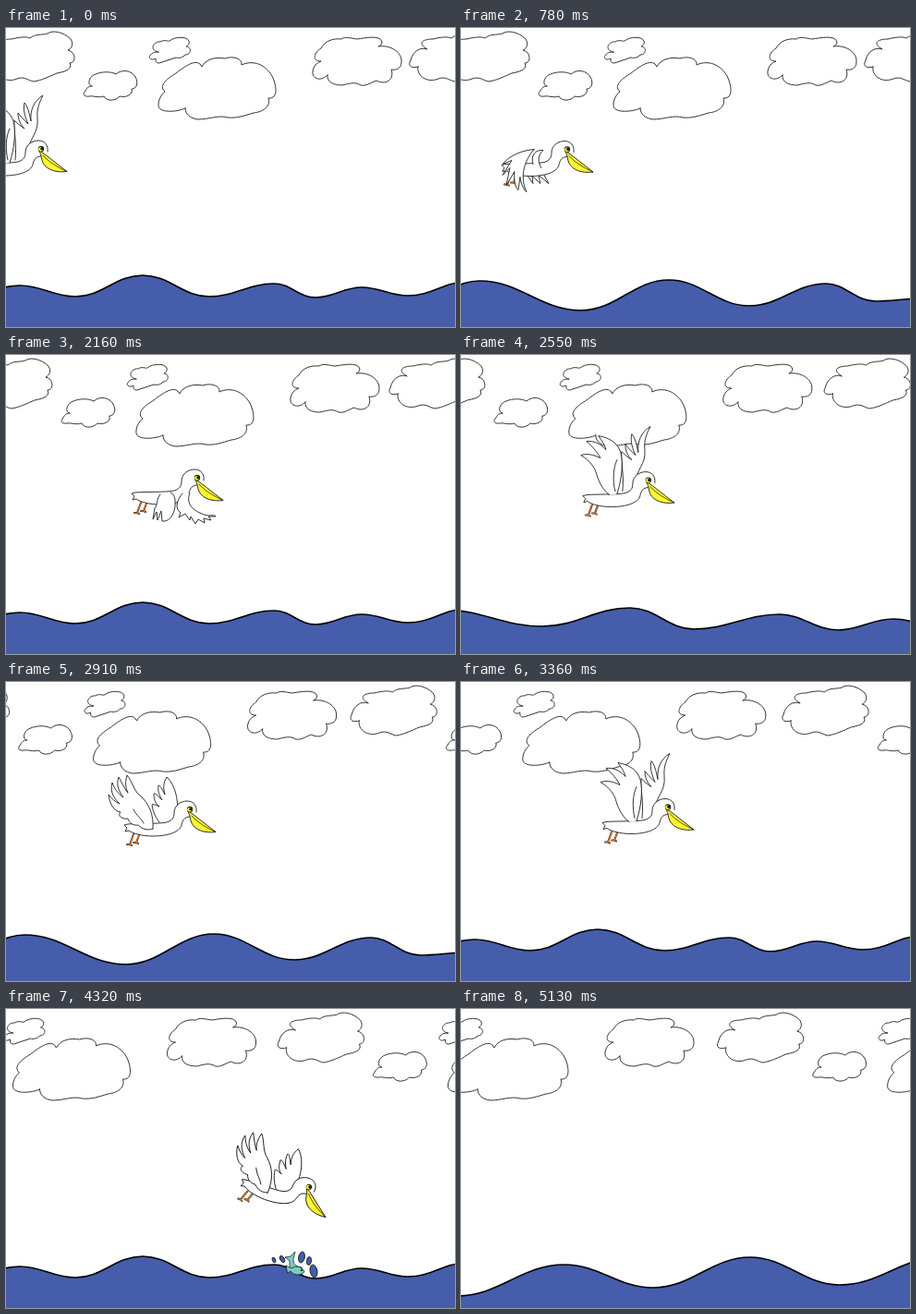
These frames come from a looping animation (486x324 px, 5250 ms). An HTML page with a canvas:

```html
<!DOCTYPE html>
<html lang="en">
<head>
<meta charset="utf-8">
<title>Pelican over the sea</title>
<style>
  html, body { margin: 0; width: 100%; height: 100%; overflow: hidden; background: #fff; }
  canvas { display: block; width: 486px; height: 324px; }
</style>
</head>
<body>
<canvas id="stage" width="486" height="324"></canvas>
<script>
const ctx = document.getElementById('stage').getContext('2d');
const STEP = 30, LOOP = 5250, LAST = 171;
const YELLOW = '#fdf733', SEA = '#455dab', TEAL = '#7cccc0', ORANGE = '#d9772b';

const clouds = new Path2D(
  'M-10,42C-16,44 -22,42 -18,35C-16,26 -8,20 0,23C-12,16 -4,12 6,12C14,10 22,9 26,11C32,6 38,8 45,6C50,2 62,4 70,12C74,18 70,23 67,24C76,26 76,38 69,38C72,44 66,47 55,49C48,52 38,57 30,58C24,57 20,52 12,55C0,60 -12,52 -10,42Z' +
  'M93,63C87,62 90,52 97,50C104,47 114,47 119,50C126,44 136,46 140,53C144,60 141,66 136,66C138,72 130,76 123,74C119,79 109,80 106,74C100,76 93,73 91,74C83,75 83,71 86,68C88,64 90,63 93,63Z' +
  'M165,26C154,24 160,14 167,15C171,12 176,15 177,14C183,9 196,9 198,14C199,17 197,19 195,20C201,20 201,29 194,29C192,32 187,33 184,32C178,34 172,36 166,38C162,38 162,36 162,33C157,36 154,32 156,30C158,27 160,26 165,26Z' +
  'M194,87C186,91 164,93 165,83C165,78 168,72 172,69C164,62 176,54 184,49C193,42 204,34 210,39L212,42C216,34 226,31 237,33C246,30 256,33 255,40C268,34 281,40 288,52C293,62 295,77 284,76C287,86 277,91 268,92C258,95 250,98 240,97C230,94 220,99 208,99C199,98 194,93 194,87Z' +
  'M348,51C342,58 331,56 332,47C333,41 336,38 341,36C330,36 334,26 341,22C345,14 354,11 363,12C367,9 373,11 380,12C388,11 405,7 407,15C407,18 405,19 403,20C416,18 429,26 428,37C428,44 422,46 417,45C421,57 410,62 401,57C393,60 390,63 384,62C378,58 372,60 364,62C355,62 347,59 348,51Z');

// Crests and troughs of the four sea drawings.
const seas = [
  [[-50, 291], [15, 279], [75, 291], [148, 268], [220, 291], [290, 277], [335, 292], [385, 281], [435, 290], [500, 275]],
  [[-20, 276], [88, 294], [183, 274], [252, 297], [345, 281], [408, 298], [468, 286], [520, 295]],
  [[-40, 290], [20, 274], [130, 306], [225, 273], [312, 301], [395, 277], [448, 296], [500, 293]],
  [[-5, 311], [112, 277], [208, 302], [313, 269], [410, 299], [520, 269]]
].map(points => {
  let d = 'M' + points[0], [px, py] = points[0];
  for (const [x, y] of points.slice(1)) {
    const c = (x - px) * 0.4;
    d += `C${px + c},${py} ${x - c},${y} ${x},${y}`;
    [px, py] = [x, y];
  }
  return new Path2D(d + 'L530,340L-60,340Z');
});

// Bird parts are placed around the eye.
const body = new Path2D('M0,8C-6,8 -8,12 -9,17C-11,25 -25,29 -40,29C-52,29 -62,26 -66,23L-70,24L-68,20L-71,17L-67,16C-55,15 -35,16 -25,14C-19,12 -17,9 -17,4C-17,-5 -9,-9 -3,-9C4,-9 8,-4 7,3');
const beak = new Path2D('M-2,2L3,5L28,24.5C17,26 6,23 2,15C0,11 1,8 -2,2Z');
const beakLine = new Path2D('M2,7C8,14 18,20 28,24.5');
const openBeak = new Path2D('M0,4L12,5L36,4L24,7L6,9ZM1,6L27,25C18,27 11,23 3,10Z');
const legs = new Path2D('M-61,27L-65,38L-68,38M-65,38L-63,39M-55,28L-58,36L-61,36M-58,36L-56,37');

// Each pose: wings behind the body, then wings over it.
const poses = {
  A: ['M-14,4C-14,-12 -2,-16 -4,-34C-5,-44 -1,-52 2,-58C-8,-52 -12,-42 -11,-30C-13,-40 -15,-47 -18,-50C-20,-42 -17,-34 -14,-27C-19,-32 -23,-36 -25,-39C-25,-31 -22,-26 -18,-22C-23,-25 -27,-29 -29,-31C-30,-20 -26,-6 -28,12',
      'M-34,15C-29,0 -27,-18 -30,-30C-33,-40 -42,-46 -54,-48C-50,-42 -47,-38 -46,-33C-52,-40 -60,-43 -67,-42C-60,-36 -55,-30 -52,-24C-60,-28 -67,-29 -73,-27C-63,-21 -58,-14 -56,-6C-53,4 -48,12 -42,16M-36,12C-39,0 -38,-14 -34,-22'],
  B: ['M-15,12C-11,-4 -14,-25 -25,-35C-29,-28 -29,-23 -27,-16C-30,-22 -32,-26 -34,-26C-35,-20 -33,-15 -30,-10C-34,-14 -37,-18 -39,-17C-39,-10 -37,-6 -33,-3C-37,-5 -40,-6 -41,-5C-40,4 -36,10 -33,14',
      'M-40,21C-39,6 -44,-6 -53,-14C-61,-20 -62,-30 -68,-37C-70,-30 -70,-24 -67,-18C-72,-24 -74,-30 -77,-35C-80,-26 -77,-20 -72,-13C-78,-17 -82,-23 -84,-29C-87,-19 -82,-12 -76,-6C-81,-8 -85,-12 -88,-16C-87,-6 -82,2 -75,3C-79,7 -73,11 -67,10C-66,15 -60,18 -56,17C-51,22 -45,23 -40,21M-61,0C-58,7 -53,9 -50,15'],
  C: ['', 'M-40,18C-45,24 -42,28 -46,33L-48,45L-44,37L-43,46L-39,36L-38,47C-28,48 -23,36 -24,25C-24,20 -26,17 -29,16' +
      'M-16,17C-23,25 -24,34 -18,38L-20,43L-13,39L-8,46L-7,42L-2,50L1,45L8,49L7,44L15,46L12,42L20,42C18,39 12,43 5,39C-3,36 -8,31 -9,26C-10,22 -9,19 -8,17'],
  D: ['M-44,27L-37,37L-38,29L-29,37L-31,28L-20,37L-26,26Z',
      'M-37,16C-40,6 -34,0 -26,1C-32,6 -32,14 -28,20' +
      'M-36,0C-48,1 -62,6 -70,16L-60,12L-70,28L-62,20L-66,39L-57,24C-58,34 -56,42 -53,44L-51,30C-50,38 -47,44 -44,46C-51,32 -48,14 -36,0Z'],
  E: ['M-20,20C-12,32 4,31 9,26L-4,12Z',
      'M-27,14C-26,30 -30,45 -44,44L-60,41C-62,35 -61,30 -59,25L-54,40L-54,27L-47,41L-48,26L-41,39C-42,30 -43,22 -40,14ZM-40,26C-40,36 -34,36 -28,34M-11,12C-13,18 -10,20 -9,16L-6,22L-4,15L0,22']
};
for (const name in poses) poses[name] = poses[name].map(d => new Path2D(d));

const fishBody = new Path2D('M-11,-5L-5,-2C0,-6 8,-3 9,2C5,6 -3,6 -6,1L-9,3Z');
const fishTail = new Path2D('M6,5C-2,6 -8,0 -7,-10L-12,-14L-6,-15L-1,-20L-3,-12C-3,-5 1,-4 6,-3Z');

// step, x, y, tilt in degrees
const flight = [
  [0, 38, 131, 0], [50, 186, 132, 0], [59, 213, 132, 0], [72, 207, 133, 0], [97, 199, 138, 0],
  [127, 249, 133, 0], [134, 274, 145, 5], [144, 328, 193, 20], [156, 358, 281, 72], [171, 380, 390, 80]
];
// x, y, size, tilt of the splash drops
const drops = [[290, 272, 3, -.4], [299, 271, 4, -.5], [320, 269, 6, .2], [328, 273, 4.5, .1], [333, 284, 7, -.2]];

function along(keys, s) {
  let i = 1;
  while (i < keys.length - 1 && keys[i][0] < s) i++;
  const a = keys[i - 1], b = keys[i], p = (s - a[0]) / (b[0] - a[0]);
  return a.slice(1).map((v, k) => v + (b[k + 1] - v) * p);
}

function shape(path, fill, width = 0.85, color = '#111') {
  if (fill) { ctx.fillStyle = fill; ctx.fill(path); }
  ctx.lineWidth = width;
  ctx.strokeStyle = color;
  ctx.stroke(path);
}

function dot(x, y, r, fill) {
  ctx.fillStyle = fill;
  ctx.beginPath();
  ctx.arc(x, y, r, 0, 7);
  ctx.fill();
}

function at(x, y, angle, draw) {
  ctx.save();
  ctx.translate(x, y);
  ctx.rotate(angle);
  draw();
  ctx.restore();
}

function drawClouds(s) {
  const shift = Math.max(0, Math.min(s, 154) - 59) * 1.853;
  for (const x of [-shift, 456 - shift * 0.905]) {
    at(x, 0, 0, () => shape(clouds, '#fff', 1, '#333'));
  }
}

function drawBird(s) {
  const [x, y, tilt] = along(flight, s);
  const open = s >= 122 && s < 137;
  let pose = s >= 140 ? 'B' : 'ABCD'[Math.floor(s % 28 / 7)];
  if (open && pose === 'C') pose = 'E';
  const [back, front] = poses[pose];
  at(x, y, tilt * Math.PI / 180, () => {
    shape(back, '#fff');
    shape(legs, null, 2, '#222');
    shape(legs, null, 1.2, ORANGE);
    shape(body, '#fff');
    shape(front, '#fff');
    shape(open ? openBeak : beak, YELLOW);
    if (!open) shape(beakLine, null, 0.7);
    dot(0, 0, 3.2, '#222');
    dot(-0.4, 0.3, 2.4, YELLOW);
    dot(0.7, -0.2, 1.5, '#111');
  });
}

function drawFish(s) {
  if (s >= 122 && s < 142) {
    const [bx, by] = along(flight, Math.min(s, 129));
    const p = Math.max(0, (s - 129) / 13);
    at(bx + 25 + (315 - bx - 25) * p, by + 15 + (283 - by - 15) * p * p, p, () => {
      shape(fishBody, TEAL, 0.8);
      dot(5, -0.5, 1.2, '#111');
    });
  } else if (s >= 142 && s < 151) {
    const k = s - 144;
    at(314, 283 + k * 2, 0, () => {
      shape(fishTail, TEAL, 0.7);
      shape(fishBody, TEAL, 0.7);
      dot(6, 0, 1.1, '#111');
    });
    for (const [x, y, r, tilt] of drops) {
      at(x + (x - 311) * 0.06 * k, y - k * 2 + k * k * 0.8, tilt, () => {
        const drop = new Path2D();
        drop.ellipse(0, 0, r * 0.55, r, 0, 0, 7);
        shape(drop, SEA, 0.8);
      });
    }
  }
}

function draw(now) {
  const s = Math.min(LAST, Math.floor(now % LOOP / STEP));
  ctx.fillStyle = '#fff';
  ctx.fillRect(0, 0, 486, 324);
  drawClouds(s);
  drawBird(s);
  shape(seas[Math.floor(s / 9) % 4], SEA, 1.6, '#000');
  drawFish(s);
}

ctx.lineJoin = 'round';
ctx.lineCap = 'round';
const start = performance.now();
function tick() {
  draw(performance.now() - start);
  requestAnimationFrame(tick);
}
tick();
</script>
</body>
</html>
```
